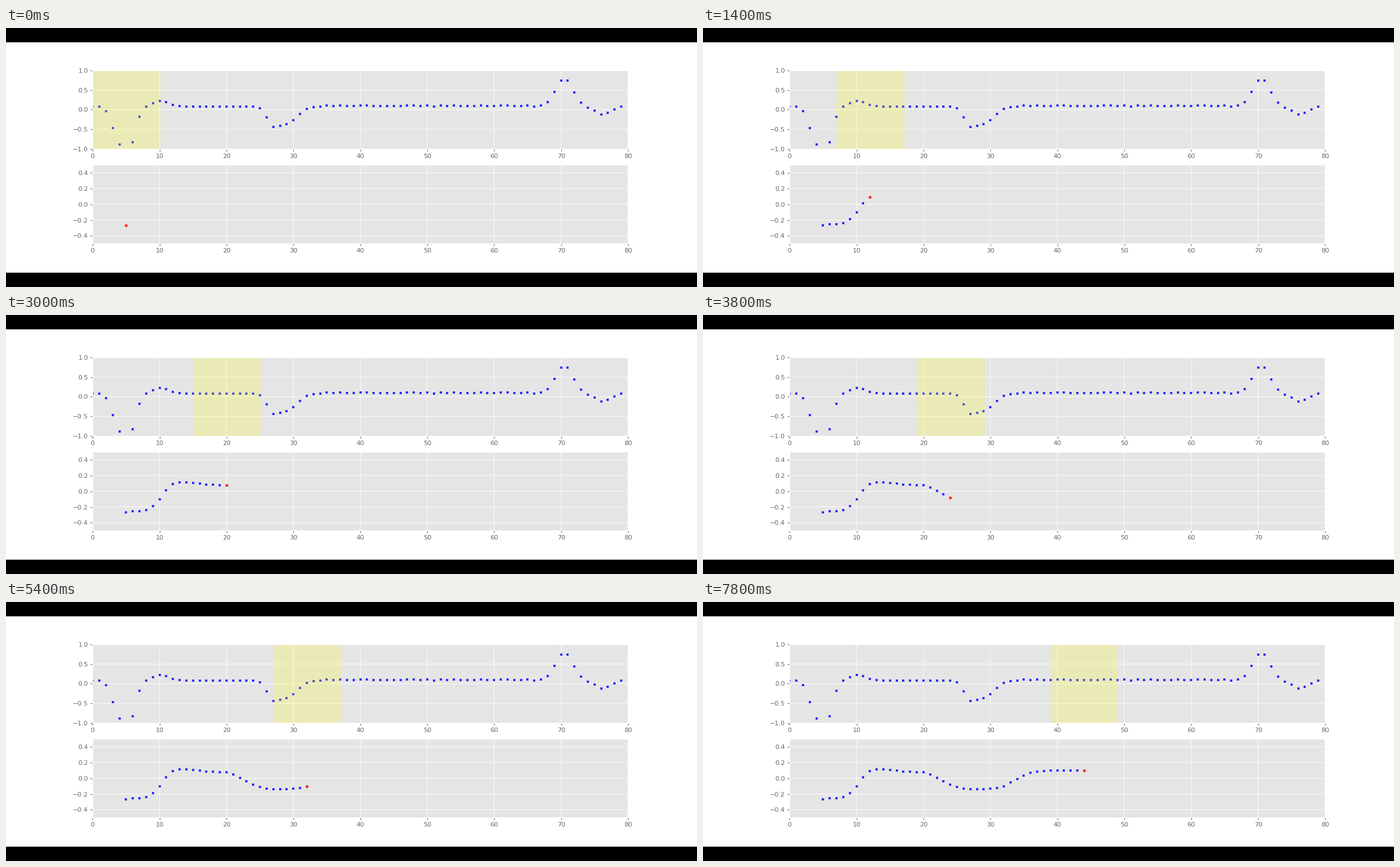
A matplotlib script that plays this animation: 1222 by 458 pixels, repeating every 8000 ms.

```python
import numpy as np
import matplotlib.pyplot as plt
from matplotlib.animation import FuncAnimation
from matplotlib.patches import Rectangle

W, H, DPI = 1222, 458, 64
PX = 72 / DPI              # points per pixel
BAR = (H - W / 3) / 2      # letterbox around a 3:1 picture
COUNT, WINDOW = 80, 10
STEPS, STEP_MS = 40, 200
GREY, LABEL = "#e5e5e5", "#666666"

# centre, height and width of each swing away from the resting level
REST, CALM_UNTIL = .08, 34
BUMPS = [
    (3.5, -.56, .84), (5.3, -1.15, 1), (10.2, .14, 1.2),
    (26.9, -.36, .9), (29.1, -.42, 1.5),
    (70.5, .71, 1.22), (76.3, -.21, 1.3),
]


def make_signal():
    x = np.arange(COUNT)
    y = np.full(COUNT, REST)
    for centre, height, width in BUMPS:
        y += height * np.exp(-((x - centre) / width) ** 2 / 2)
    noise = np.random.default_rng(4).uniform(0, .035, COUNT)
    return x, y + np.where(x > CALM_UNTIL, noise, 0)


def style(ax, limit, ticks):
    ax.set(xlim=(0, COUNT), ylim=(-limit, limit), facecolor=GREY,
           xticks=range(0, COUNT + 1, 10), yticks=ticks)
    ax.set_axisbelow(True)
    ax.grid(color="white", linewidth=1.3 * PX, alpha=.7, snap=False)
    ax.tick_params(length=4 * PX, width=1.1 * PX, pad=4 * PX, color=LABEL,
                   labelcolor=LABEL, labelsize=11.3 * PX)
    for spine in ax.spines.values():
        spine.set(color="white", linewidth=1.2 * PX)


def dots(ax, color, marker, size, **kw):
    return ax.plot([], [], marker, color=color, markersize=size * PX,
                   markeredgewidth=0, alpha=.8, snap=False, **kw)[0]


x, signal = make_signal()
# centred mean, both window ends included
mean = np.convolve(signal, np.ones(WINDOW + 1) / (WINDOW + 1), "valid")
mean_x = np.arange(len(mean)) + WINDOW // 2

plt.rcParams["font.family"] = "DejaVu Sans"
fig, (top, bottom) = plt.subplots(2, 1, figsize=(W / DPI, H / DPI), dpi=DPI,
                                  facecolor="white")
fig.subplots_adjust(left=153.3 / W, right=1100 / W, top=1 - 74.8 / H,
                    bottom=76.7 / H, hspace=.2)
for y in (0, H - BAR):
    fig.add_artist(Rectangle((0, y / H), 1, BAR / H, color="black",
                             linewidth=0, snap=False))

style(top, 1, np.linspace(-1, 1, 5))
style(bottom, .5, np.linspace(-.4, .4, 5))

dots(top, "blue", "s", 3.5).set_data(x, signal)
span = Rectangle((0, -1), WINDOW + .1, 2, facecolor="yellow", linewidth=0,
                 alpha=.2, zorder=2.2)
top.add_patch(span)
past = dots(bottom, "blue", "s", 3.5)
current = dots(bottom, "red", "o", 5.2, zorder=3)


def update(i):
    span.set_x(i)
    past.set_data(mean_x[:i], mean[:i])
    current.set_data(mean_x[i:i + 1], mean[i:i + 1])
    return span, past, current


anim = FuncAnimation(fig, update, frames=STEPS, interval=STEP_MS,
                     repeat=True, repeat_delay=0)
plt.show()
```
